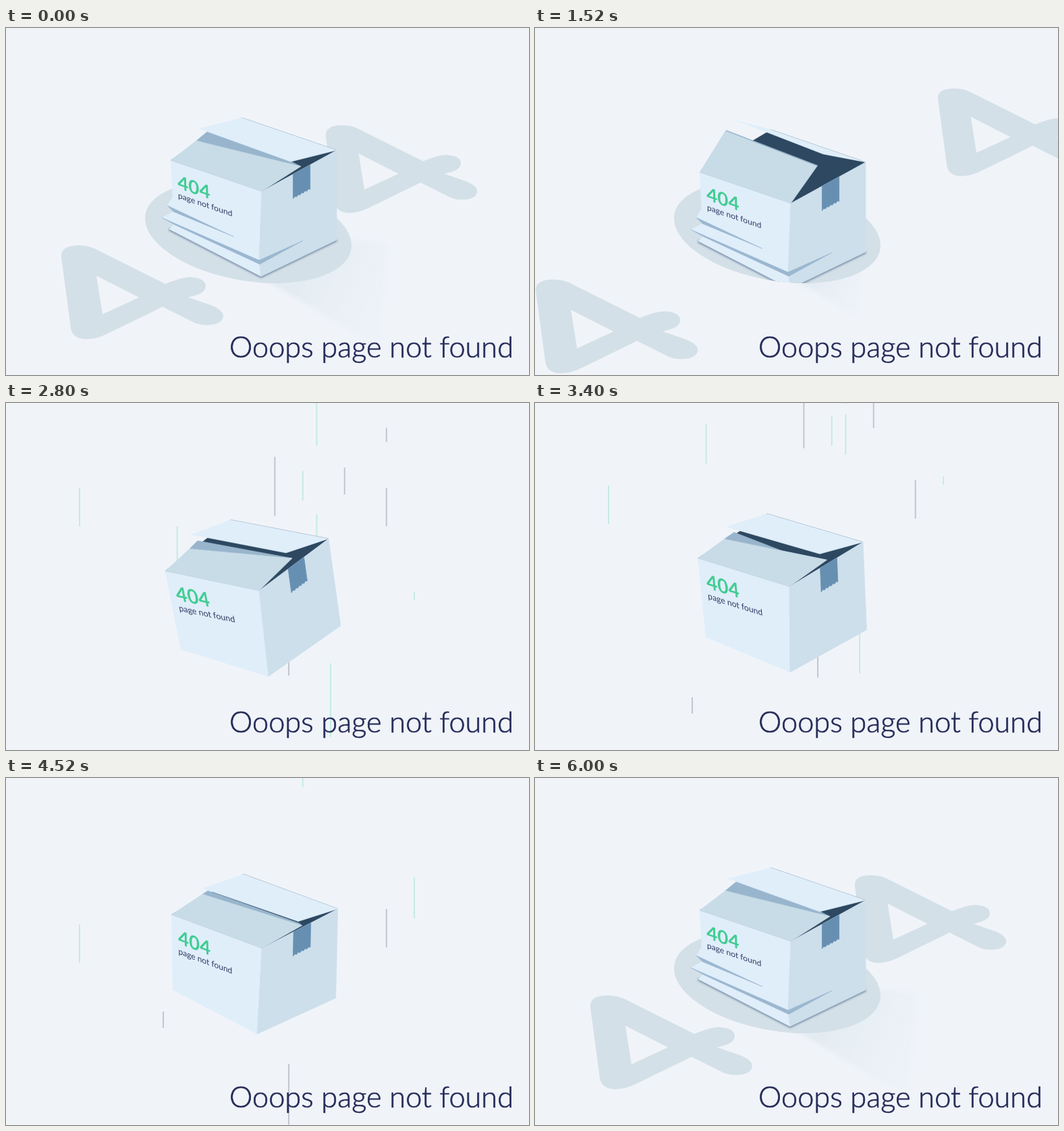
An HTML page with a canvas for the animation above (6.8 s loop, 775 by 514 pixels).

```html
<!DOCTYPE html>
<html lang="en">
<head>
<meta charset="utf-8">
<title>Page not found</title>
<style>
html, body { margin: 0; width: 100%; height: 100%; overflow: hidden; background: #f0f4f9; }
canvas { display: block; width: 775px; height: 514px; }
</style>
</head>
<body>
<canvas id="stage"></canvas>
<script>
const LOOP = 6800, W = 775, H = 514;
const canvas = document.getElementById('stage');
const ctx = canvas.getContext('2d');
const dpr = window.devicePixelRatio || 1;
canvas.width = W * dpr;
canvas.height = H * dpr;

const clamp = v => Math.max(0, Math.min(1, v));
const ramp = (t, from, to) => clamp((t - from) / (to - from));
const smooth = p => p * p * (3 - 2 * p);
const lerp = (a, b, k) => a + (b - a) * k;
const mixPoint = (p, q, k) => [lerp(p[0], q[0], k), lerp(p[1], q[1], k)];

// Box corners: a-b-c-g is the top rim, d-e-f the base; p-q and r-s are the
// free edges of the front and back flaps, u-v the edge of the inner flap.
const rest = {
  a: [244, 196], b: [379, 242], c: [490, 181], g: [350, 133],
  d: [247, 303], e: [378, 368], f: [490, 314],
  p: [282, 167], q: [437, 205], r: [286, 149], s: [422, 198], u: [299, 153], v: [423, 198]
};
const open = { ...rest,
  p: [282, 135], q: [418, 187], r: [298, 119], s: [427, 169], u: [284, 134], v: [419, 186]
};
const landed = { ...rest, e: [376, 369],
  p: [293, 161], q: [437, 206], r: [291, 157], s: [436, 203], u: [294, 158], v: [436, 203]
};
const tiltLeft = {
  a: [236, 249], b: [375, 278], c: [478, 201], g: [333, 173],
  d: [259, 365], e: [389, 405], f: [496, 330],
  p: [272, 216], q: [424, 230], r: [275, 195], s: [415, 222], u: [284, 204], v: [300, 207]
};
const tiltRight = {
  a: [247, 211], b: [379, 266], c: [494, 211], g: [355, 155],
  d: [247, 328], e: [367, 393], f: [487, 342],
  p: [289, 187], q: [441, 235], r: [292, 172], s: [429, 225], u: [306, 179], v: [432, 231]
};
const mixPose = (from, to, k) =>
  Object.fromEntries(Object.keys(from).map(n => [n, mixPoint(from[n], to[n], k)]));

const four = new Path2D(`M0 18 Q-2 0 26 0 Q42 0 56 8 L154 57 Q178 47 191 47 Q214 48 214 61
  Q213 70 199 74 L188 77 L223 89 Q240 96 240 105 Q238 118 214 118 Q202 118 190 111 L150 91
  L68 131 Q52 139 36 139 Q16 138 14 122 Z M52 45 L61 102 L115 77 Z`);

// column, green?, length, top at 2800 ms, top at 4000 ms
const streaks = [
  [0, 0, 50, 580, 540], [3, 1, 57, 127, 120], [9, 0, 24, 540, 335], [10, 1, 60, 184, -120],
  [14, 0, 70, 560, -19], [17, 0, 88, 81, -120], [17, 0, 10, -120, 29], [18, 0, 90, 315, 321],
  [19, 1, 44, 102, -60], [20, 1, 70, -5, -130], [20, 1, 60, 166, -130], [21, 1, 109, 387, 199],
  [22, 0, 40, 97, -100], [25, 0, 21, 38, -100], [25, 0, 57, 127, 104], [27, 1, 12, 281, -60],
  [27, 1, 60, -140, -9]
];

// The hairline outline hides seams between neighbouring faces.
function polygon(color, ...points) {
  ctx.beginPath();
  points.forEach(([x, y]) => ctx.lineTo(x, y));
  ctx.closePath();
  ctx.fillStyle = ctx.strokeStyle = color;
  ctx.lineWidth = 0.6;
  ctx.lineJoin = 'round';
  ctx.fill();
  ctx.stroke();
}

function label(text, font, color, x, y, outline = 0) {
  ctx.font = font;
  ctx.fillStyle = ctx.strokeStyle = color;
  ctx.fillText(text, x, y);
  if (!outline) return;
  ctx.lineWidth = outline;
  ctx.lineJoin = 'round';
  ctx.strokeText(text, x, y);
}

// Maps local units onto a box face with its origin and two edge vectors.
function onFace(origin, right, down, width, height, draw) {
  ctx.save();
  ctx.transform((right[0] - origin[0]) / width, (right[1] - origin[1]) / width,
    down[0] / height, down[1] / height, origin[0], origin[1]);
  draw();
  ctx.restore();
}

function drawFour(x, y, scale, alpha) {
  ctx.save();
  ctx.globalAlpha = alpha;
  ctx.translate(x, y);
  ctx.scale(scale, scale);
  ctx.fillStyle = '#d4e0e8';
  ctx.fill(four, 'evenodd');
  ctx.restore();
}

function drawFours(t) {
  if (t > 2040 && t < 5360) return;
  const leave = t < 5000 ? Math.max(0, t - 1360) / 160 : 0;
  const away = Math.pow(leave, 1.5);
  const shown = t >= 5360 ? smooth(ramp(t, 5360, 5840)) : 1;
  const hide = 1 - shown, alpha = clamp(shown * 4);
  drawFour(82 - 80 * away + 150 * hide, 322 + 50 * away - 91 * hide, 1, alpha);
  drawFour(474 + 122 * away - 185 * hide, 144 - 54 * away + 83 * hide, 0.935, alpha);
}

function holePath(scale) {
  ctx.ellipse(359, 302, 154.7 * scale, 72.5 * scale, 0.167, 0, Math.PI * 2);
}

function drawHole(t) {
  const scale = t < 4000 ? 1 - smooth(ramp(t, 1920, 2040)) : smooth(ramp(t, 5240, 5640));
  if (!scale) return;
  ctx.beginPath();
  holePath(scale);
  ctx.fillStyle = '#d4e0e8';
  ctx.fill();
}

function drawShadow(t) {
  const scale = t < 4000 ? 1 - ramp(t, 1360, 1700) : ramp(t, 4900, 4980);
  if (!scale) return;
  ctx.save();
  ctx.translate(390, 375);
  ctx.scale(scale, scale);
  ctx.translate(-390, -375);
  const fade = ctx.createLinearGradient(400, 335, 560, 400);
  fade.addColorStop(0, 'rgba(220,231,237,.85)');
  fade.addColorStop(1, 'rgba(233,239,247,.4)');
  ctx.filter = 'blur(3px)';
  polygon(fade, [378, 368], [490, 314], [562, 320], [553, 462], [520, 452]);
  ctx.restore();
}

function drawStreaks(t) {
  if (t < 2400 || t > 5000) return;
  const span = 760;
  for (const [column, green, length, start, later] of streaks) {
    const speed = (2 * span + start - later) / 1200;
    const raw = start - speed * (t - 2800) + 150;
    const y = ((raw % span) + span) % span - 150;
    const entered = t - (H - y) / speed;
    if (entered < 2405 || entered > 4450) continue;
    ctx.fillStyle = green ? '#c5ebe0' : '#c2c6cd';
    ctx.fillRect(46 + column * 20.67, y, 2, length);
  }
}

function boxState(t) {
  if (t < 2040) {
    return { pose: mixPose(rest, open, smooth(ramp(t, 1360, 1520))),
      y: 280 * ramp(t, 1360, 2000) ** 2, crush: 1, settle: 1 };
  }
  if (t < 4000) {
    return { pose: mixPose(tiltLeft, tiltRight, smooth(ramp(t, 2800, 4000))),
      y: -457 * (1 - smooth(ramp(t, 2240, 2800))), crush: 0, settle: 0 };
  }
  if (t < 4970) {
    const hop = smooth(ramp(t, 4700, 4900)) - ramp(t, 4900, 4970) ** 2;
    return { pose: mixPose(tiltRight, landed, smooth(ramp(t, 4000, 4950))),
      y: -90 * hop, crush: 0, settle: 0 };
  }
  const crush = 1 - (1 - ramp(t, 4970, 5300)) ** 6;
  const settle = clamp((crush - 0.45) / 0.55);
  return { pose: mixPose(landed, rest, settle), y: 0, crush, settle };
}

function drawBox(t) {
  if (t > 2000 && t < 2240) return;
  const { pose, y, crush, settle } = boxState(t);
  const { a, b, c, g, d, e, f, p, q, r, s, u, v } = pose;
  ctx.save();
  if (t < 2040) {
    ctx.beginPath();
    ctx.rect(0, 0, W, 302);
    holePath(1);
    ctx.clip();
  }
  ctx.translate(0, y);

  const creases = [[247, 250], [239, 263], [248, 272], [231, 281], [249, 291], [242, 298]]
    .map((point, i) => mixPoint(mixPoint(a, d, 0.5 + i / 10), point, crush));
  const knee = mixPoint(mixPoint(b, e, 0.8), [375, 344], crush);

  if (settle) {
    ctx.save();
    ctx.globalAlpha = settle;
    ctx.filter = 'blur(1.5px)';
    ctx.strokeStyle = '#7188a3';
    ctx.lineWidth = 4;
    ctx.beginPath();
    [creases[5], e, f].forEach(([px, py]) => ctx.lineTo(px, py));
    ctx.stroke();
    ctx.restore();
  }

  polygon('#2d4860', a, g, c, b);
  polygon('#e0eefa', a, b, knee, e, ...creases.slice().reverse());
  polygon('#cddfeb', b, c, f, e, knee);

  if (crush) {
    const fold = '#9bb7d0';
    const depth = crush ** 2;
    const kneeBase = [knee[0] + 1, knee[1] + 6 * depth];
    polygon(fold, creases[1], [337, 309], mixPoint(creases[1], creases[2], depth));
    polygon(fold, creases[3], knee, kneeBase, mixPoint(creases[3], creases[4], depth));
    polygon(fold, knee, [440, 315], kneeBase);
  }

  polygon('#98b5cd', p, u, v, q);
  polygon('#c8dce7', a, p, q, b);
  polygon('#e0eefa', r, g, c, s);

  onFace(b, c, [f[0] - c[0], f[1] - c[1]], 110, 133, () => {
    const teeth = Array.from({ length: 11 }, (_, i) => [71 - 2.5 * i, i % 2 ? 34.5 : 36.5]);
    polygon('#668fb2', [46, 0], [71, 0], ...teeth);
  });

  onFace(a, b, [d[0] - a[0], d[1] - a[1]], 136, 110, () => {
    label('404', '700 28px Lato, sans-serif', '#42cc93', 9.5, 39);
    label('page not found', '400 12.2px Lato, sans-serif', '#303a63', 9.5, 54);
  });
  ctx.restore();
}

function render(t) {
  ctx.setTransform(dpr, 0, 0, dpr, 0, 0);
  ctx.fillStyle = '#f0f4f9';
  ctx.fillRect(0, 0, W, H);
  drawShadow(t);
  drawFours(t);
  drawHole(t);
  drawStreaks(t);
  drawBox(t);
  ctx.textAlign = 'right';
  label('Ooops page not found', '300 43.3px Lato, sans-serif', '#262c59', 752, 488, 0.7);
  ctx.textAlign = 'left';
}

const began = performance.now();
function tick() {
  render((performance.now() - began) % LOOP);
  requestAnimationFrame(tick);
}
tick();
</script>
</body>
</html>
```
